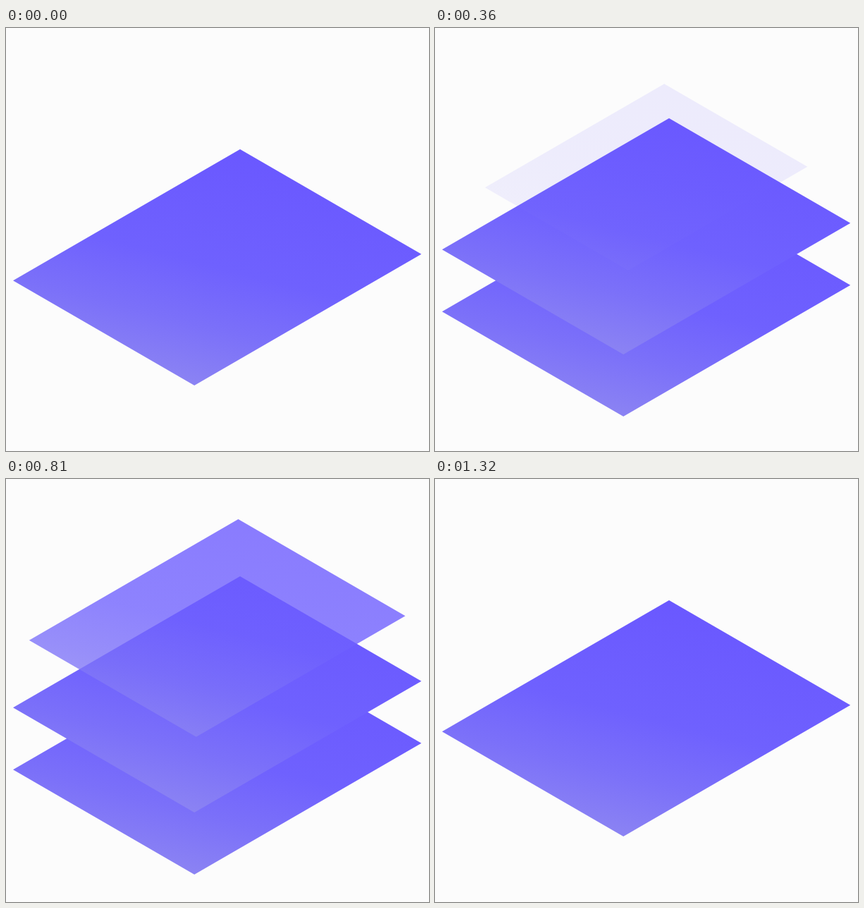
Animation, 600 px wide and 600 px high, one loop 1.5 s. Source, as an HTML page with a canvas:

```html
<!DOCTYPE html>
<html lang="en">
<head>
<meta charset="utf-8">
<title>Stacking layers</title>
<style>
  html, body { margin: 0; height: 100%; overflow: hidden; background: #fcfcfc; }
  canvas { display: block; }
</style>
</head>
<body>
<canvas id="stage" width="600" height="600"></canvas>
<script>
const ctx = document.getElementById("stage").getContext("2d");
const LOOP = 1500, STEP = 30, PHASE = 300;
const CENTER = { x: 299.7, y: 339.5 };
const START_SCALE = 0.737;

const sheet = new Path2D("M-289.7 18.7 L32.3 -167.6 L289.5 -18.8 L-32.5 167.5 Z");
const fill = ctx.createLinearGradient(42, -165, -42, 165);
fill.addColorStop(0, "#6a58ff");
fill.addColorStop(0.5, "#6f61fe");
fill.addColorStop(0.75, "#7b70f9");
fill.addColorStop(1, "#8b83f3");

const clamp = v => Math.min(1, Math.max(0, v));
const smooth = p => p * p * (3 - 2 * p);

// p runs from 0 (hidden, small) to 1 (fully in place)
function drawLayer(offset, p) {
  if (p <= 0) return;
  const scale = START_SCALE + (1 - START_SCALE) * p;
  ctx.save();
  ctx.translate(CENTER.x, CENTER.y + offset);
  ctx.scale(scale, scale);
  ctx.globalAlpha = smooth(p);
  ctx.fillStyle = fill;
  ctx.fill(sheet);
  ctx.restore();
}

// Build up, hold, play backwards, hold
function poseTime(t) {
  return t < 750 ? Math.min(t, 2 * PHASE) : Math.max(0, 1320 - t);
}

function draw(now) {
  const t = poseTime(Math.floor((now % LOOP) / STEP) * STEP);
  const second = clamp(t / PHASE);
  const third = clamp((t - PHASE) / PHASE);

  ctx.fillStyle = "#fcfcfc";
  ctx.fillRect(0, 0, 600, 600);
  drawLayer(40 * second + 20 * third, 1);
  drawLayer(-48 + 20 * third, second);
  drawLayer(-128, third);
}

function tick() {
  draw(performance.now());
  requestAnimationFrame(tick);
}
tick();
</script>
</body>
</html>
```
